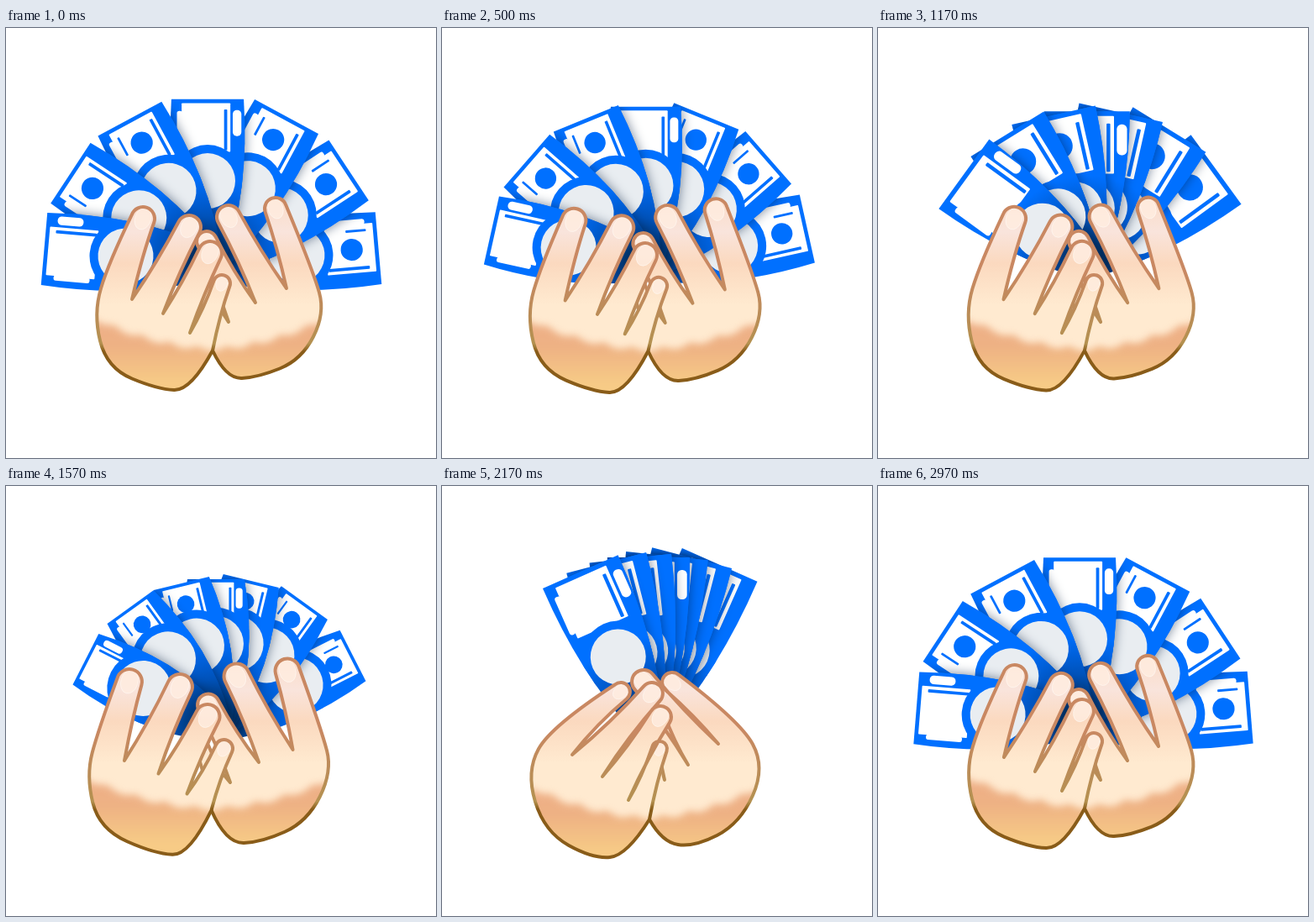
An HTML page with a canvas that plays this animation: 512 by 512 pixels, repeating every 3010 ms.

```html
<!DOCTYPE html>
<html lang="en">
<head>
<meta charset="utf-8">
<title>Fan of banknotes</title>
<style>
html, body { margin: 0; width: 100%; height: 100%; overflow: hidden; background: #fff; }
canvas { display: block; width: 512px; height: 512px; }
</style>
</head>
<body>
<canvas id="stage" width="512" height="512"></canvas>
<script>
const g = document.getElementById('stage').getContext('2d');
const LOOP = 3010, STEPS = 90, BLUE = '#0070ff';

// step, fan angle, note reach, note end width, hand push, fingertip drop, hand closing
const KEYS = [
  [0, 85, 195, 86, 0, 0, 0],
  [2, 85, 212, 96, -.1, 0, 0],
  [7, 71, 178, 64, 1, 0, 0],
  [11, 74, 176, 70, .55, 9, 0],
  [17, 79, 196, 90, .03, 0, 0],
  [20, 80, 211, 98, -.1, 0, 0],
  [23, 63, 170, 66, .65, 0, 0],
  [25, 61, 166, 62, 1, 0, 0],
  [29, 64, 174, 70, .55, 9, 0],
  [35, 54, 181, 102, .03, 0, 0],
  [38, 65, 202, 104, -.1, 0, 0],
  [43, 62, 172, 64, 1, 0, 0],
  [47, 63, 174, 68, .5, 9, 0],
  [53, 48, 185, 98, .05, 0, 0],
  [56, 45, 198, 102, 0, 0, .05],
  [65, 24, 200, 98, 0, 0, 1],
  [73, 60, 200, 94, 0, 0, .5],
  [80, 84, 201, 88, .05, 0, .05],
  [86, 86, 195, 86, .02, 0, 0],
  [90, 85, 195, 86, 0, 0, 0]
];

// Per pose: wrist corner, five palm controls, four fingertips (x, y, r), three valleys
const LEFT = {
  open: [246,384, 220,432, 180,430, 120,405, 104,340, 122,280,
    163,227,14, 218,237,14, 243,268,14, 257,304,10, 150,323, 187,340, 219,363],
  push: [243,388, 217,447, 175,446, 102,412, 87,350, 98,300,
    131,221,16, 196,223,16, 237,263,15, 262,303,11, 132,331, 176,345, 212,370],
  shut: [247,397, 220,440, 180,444, 122,412, 100,340, 130,286,
    213,245,11, 250,247,13, 260,275,13, 259,313,9, 155,320, 191,346, 222,374]
};
const RIGHT = {
  open: [246,384, 262,418, 300,416, 352,395, 380,340, 366,290,
    321,215,13, 265,225,14, 239,254,12, 232,300,8, 334,310, 297,327, 265,350],
  push: [243,388, 262,434, 310,432, 366,404, 397,340, 385,290,
    349,207,16, 284,210,16, 243,249,14, 235,305,8, 349,318, 305,331, 269,356],
  shut: [247,397, 262,424, 300,430, 355,402, 385,335, 355,280,
    274,234,12, 240,233,14, 255,275,10, 250,300,8, 329,307, 293,332, 265,350]
};

// Smooth curve through the keys
function state(n) {
  let i = 0;
  while (i < KEYS.length - 2 && n >= KEYS[i + 1][0]) i++;
  const a = KEYS[i], b = KEYS[i + 1], p = KEYS[i - 1] || a, q = KEYS[i + 2] || b;
  const span = b[0] - a[0], u = (n - a[0]) / span, u2 = u * u, u3 = u2 * u;
  return a.map((v, j) => {
    const ma = (b[j] - p[j]) / (b[0] - p[0]) * span;
    const mb = (q[j] - v) / (q[0] - a[0]) * span;
    return (2 * u3 - 3 * u2 + 1) * v + (u3 - 2 * u2 + u) * ma +
      (3 * u2 - 2 * u3) * b[j] + (u3 - u2) * mb;
  });
}

function box(x, y, w, h, r, color) {
  g.fillStyle = color;
  g.beginPath();
  g.roundRect(x, y, w, h, r);
  g.fill();
}

function disc(x, y, r, color) {
  g.fillStyle = color;
  g.beginPath();
  g.arc(x, y, r, 0, 7);
  g.fill();
}

function note(px, py, angle, reach, width, hasPill) {
  const half = width / 2, k = width / 92;
  g.save();
  g.translate(px, py);
  g.rotate(angle);
  const body = new Path2D();
  body.moveTo(-20, 0);
  body.quadraticCurveTo(-50, -reach * .45, -half, -reach);
  body.lineTo(half, -reach);
  body.quadraticCurveTo(50, -reach * .45, 20, 0);
  body.closePath();

  const tone = g.createRadialGradient(0, 0, 15, 0, 0, 105);
  tone.addColorStop(0, '#002a55');
  tone.addColorStop(.45, '#0052ba');
  tone.addColorStop(1, BLUE);
  g.fillStyle = tone;
  // Shadow falls on the notes below only
  g.globalCompositeOperation = 'source-atop';
  g.shadowColor = 'rgba(0,25,60,.55)';
  g.shadowBlur = 14;
  g.fill(body);
  g.shadowColor = 'transparent';
  g.globalCompositeOperation = 'source-over';
  g.fill(body);
  g.clip(body);

  g.save();
  g.translate(0, -reach);
  g.scale(k, k);
  box(-33, 5, 62, 62, 1, '#fff');
  box(-39, 15, 7, 46, 3, '#fff');
  box(21, 13, 4, 52, 1, BLUE);
  if (hasPill) {
    box(32, 14, 11, 33, 5, '#fff');
  } else {
    box(-26, 14, 3, 26, 1, BLUE);
    disc(-1, 34, 14, BLUE);
  }
  g.restore();

  const y = 104 * k - reach;
  disc(0, y, 43, tone);
  disc(0, y, 33, '#e9edf1');
  g.restore();
}

function hand(poses, side, push, drop, shut) {
  const v = poses.open.map((o, i) =>
    o + (poses.push[i] - o) * push + (poses.shut[i] - o) * shut);
  const at = i => [v[i], v[i + 1]];
  const mid = (a, b) => [(a[0] + b[0]) / 2, (a[1] + b[1]) / 2];
  const wrist = at(0), palm = [2, 4, 6, 8, 10].map(at);
  const gaps = [palm[4], at(24), at(26), at(28), wrist];
  const path = new Path2D(), nails = [];

  path.moveTo(...wrist);
  for (let i = 0; i < 4; i++) path.quadraticCurveTo(...palm[i], ...mid(palm[i], palm[i + 1]));
  for (let i = 0; i < 4; i++) {
    const x = v[12 + i * 3], y = v[13 + i * 3] + drop, r = v[14 + i * 3];
    const base = mid(gaps[i], gaps[i + 1]);
    const a = Math.atan2(y - base[1], x - base[0]);
    const len = Math.hypot(x - base[0], y - base[1]) * .5;
    const edge = (s, back) => [
      x + Math.cos(a + s * Math.PI / 2) * r - Math.cos(a) * back,
      y + Math.sin(a + s * Math.PI / 2) * r - Math.sin(a) * back];
    path.quadraticCurveTo(...(i ? edge(-side, len) : palm[4]), ...edge(-side, 0));
    path.arc(x, y, r, a - side * Math.PI / 2, a + side * Math.PI / 2, side < 0);
    path.quadraticCurveTo(...edge(side, len), ...gaps[i + 1]);
  }
  path.closePath();

  const skin = g.createLinearGradient(0, 205, 0, 330);
  skin.addColorStop(0, '#fbdcc8');
  skin.addColorStop(.3, '#f9e4dc');
  skin.addColorStop(.6, '#fbd9bf');
  skin.addColorStop(1, '#ffead0');
  g.fillStyle = skin;
  g.fill(path);

  g.save();
  g.clip(path);
  const outer = mid(palm[3], palm[4])[0], low = wrist[1] - 6;
  const glow = g.createLinearGradient(0, low - 30, 0, low + 45);
  glow.addColorStop(0, '#eeb088');
  glow.addColorStop(.4, '#eeb184');
  glow.addColorStop(1, '#f7cb86');
  g.fillStyle = glow;
  g.filter = 'blur(4px)';
  g.beginPath();
  g.moveTo(wrist[0] + side * 15, 470);
  for (let i = 0; i <= 40; i++) {
    const u = i / 40;
    g.lineTo(wrist[0] + side * 15 + (outer - side * 25 - wrist[0]) * u,
      low + 2 - 38 * u * u + 5 * Math.abs(Math.sin(u * 15)));
  }
  g.lineTo(outer - side * 20, 470);
  g.fill();
  g.filter = 'none';

  for (let i = 0; i < 4; i++) {
    const x = v[12 + i * 3], y = v[13 + i * 3] + drop, r = v[14 + i * 3];
    const base = mid(gaps[i], gaps[i + 1]);
    g.beginPath();
    g.ellipse(x, y, r * .95, r * .68, Math.atan2(y - base[1], x - base[0]), 0, 7);
    g.fillStyle = 'rgba(255,238,226,.8)';
    g.fill();
    g.strokeStyle = 'rgba(255,250,245,.6)';
    g.lineWidth = 1;
    g.stroke();
  }
  g.restore();

  const line = g.createLinearGradient(0, 290, 0, 385);
  line.addColorStop(0, '#c98862');
  line.addColorStop(.5, '#bb8c58');
  line.addColorStop(.9, '#b49150');
  line.addColorStop(1, '#895c19');
  g.strokeStyle = line;
  g.lineWidth = 4;
  g.lineJoin = 'round';
  g.stroke(path);
}

function draw(now) {
  const [n, spread, reach, width, push, drop, shut] = state(now % LOOP / LOOP * STEPS);
  const px = 245 - 5 * Math.cos(n / STEPS * 2 * Math.PI), py = 280 + 10 * push + 5 * shut;
  const bend = 1 + Math.min(n, STEPS - n) / 110;
  g.clearRect(0, 0, 512, 512);
  for (let i = 3; i >= -3; i--) {
    const angle = Math.sign(i) * Math.abs(i / 3) ** bend * spread * Math.PI / 180;
    note(px, py, angle, reach + Math.max(0, i) * 3, width, i === 0 || i === -3);
  }
  hand(RIGHT, -1, push, drop, shut);
  hand(LEFT, 1, push, drop, shut);
}

const start = performance.now();
function tick() {
  draw(performance.now() - start);
  requestAnimationFrame(tick);
}
tick();
</script>
</body>
</html>
```
